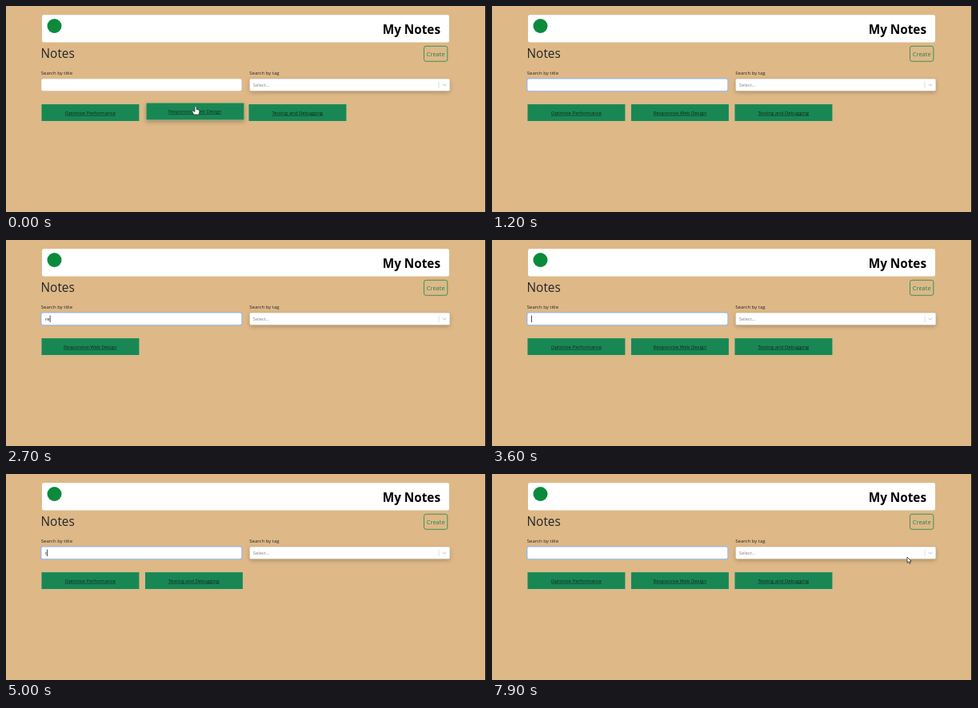
Animation, 600 px wide and 258 px high, one loop 8000 ms. Source, as an HTML page:

```html
<!DOCTYPE html>
<html lang="en">
<head>
<meta charset="utf-8">
<title>My Notes</title>
<style>
  html, body { margin: 0; height: 100%; overflow: hidden; background: #deb887; }
  svg { display: block; width: 100vw; height: 100vh; }
  text { font: 6px "Open Sans", "Noto Sans", sans-serif; fill: #212529; }
  .brand { font-size: 15.3px; font-weight: 700; fill: #000; }
  .heading { font-size: 15.4px; font-weight: 500; }
  .create { font-size: 7.5px; fill: #198754; }
  .hint { font-size: 5.8px; fill: #808080; }
  .card text { text-anchor: middle; text-decoration: underline; fill: #10251b; }
  .field { fill: #fff; stroke: #ced4da; stroke-width: .4; }
  .shade { filter: drop-shadow(0 2.5px 2.5px rgba(0, 0, 0, .22)); }
</style>
</head>
<body>
<svg viewBox="0 0 600 258">
  <rect width="600" height="258" fill="#deb887"/>
  <rect x="599" width="1" height="258" fill="#111"/>

  <rect x="45" y="11" width="509" height="34.5" rx="2.5" fill="#fff"/>
  <circle cx="60.5" cy="25" r="9" fill="#0b8a3c"/>
  <text class="brand" x="543" y="34.6" text-anchor="end">My Notes</text>

  <text class="heading" x="43.5" y="64.5">Notes</text>
  <rect x="522.5" y="50.3" width="29.3" height="19" rx="2.5" fill="none" stroke="#198754" stroke-width=".8"/>
  <text class="create" x="537.2" y="62.6" text-anchor="middle">Create</text>

  <text x="43.8" y="85.6">Search by title</text>
  <text x="304.3" y="85.6">Search by tag</text>

  <rect id="ring" x="43" y="90.2" width="252.6" height="17.2" rx="2.8" fill="#a6b5cf"/>
  <rect id="input" class="field" x="44.2" y="91.3" width="250.3" height="15" rx="2"/>
  <text id="query" x="49" y="101"></text>
  <rect id="caret" y="94.6" width=".8" height="8.4" fill="#222"/>

  <rect class="field shade" x="304.7" y="91.3" width="250" height="15" rx="1.6"/>
  <text class="hint" x="308.8" y="101">Select...</text>
  <path d="M541 94.5v8.6" stroke="#ccc" stroke-width=".6"/>
  <path d="M545.7 97.8l2.3 2.3 2.3-2.3" fill="none" stroke="#bbb" stroke-width=".9"/>

  <g id="cards"></g>

  <g id="hand">
    <path d="M-1 0Q0-1.2 1 0V3.5L4 4.2Q5 4.6 4.8 6L4 10H-2L-4.5 6Q-4 4.7-2.6 5.5L-1 6.6Z" fill="#fff" stroke="#222" stroke-width=".6"/>
  </g>
  <path id="arrow" d="M0 0V7.2L1.7 5.7 2.9 8.2 4.1 7.6 3 5.2H5.2Z" fill="#fff" stroke="#111" stroke-width=".7"/>
  <path id="beam" d="M-1.3-3.5H1.3M0-3.5V3.5M-1.3 3.5H1.3" stroke="#333" stroke-width=".6"/>
</svg>
<script>
const LOOP = 8000, STEP = 100, BLINK = 355;
const FOCUS = 840, REST = 300, HIDE = 1200, RETURN = 7700;
const titles = ['Optimize Performance', 'Responsive Web Design', 'Testing and Debugging'];
const edits = [
  [FOCUS, ''], [1400, 'o'], [1500, 'op'], [2100, 'o'], [2300, ''],
  [2540, 're'], [3200, 'r'], [3600, ''], [4300, 't'], [4500, 'te'],
  [5000, 't'], [5200, '']
];
const $ = id => document.getElementById(id);
const show = (el, on) => el.setAttribute('visibility', on ? 'visible' : 'hidden');
const move = (el, x, y) => el.setAttribute('transform', `translate(${x} ${y})`);
const ease = (t, from, to) => {
  const p = Math.min(1, Math.max(0, (t - from) / (to - from)));
  return p * p * (3 - 2 * p);
};

$('cards').innerHTML = titles.map(title => `<g class="card">
  <rect x="44" y="122.8" width="122.8" height="22" rx=".6" fill="#b5c39a"/>
  <rect x="44.5" y="123.1" width="121.9" height="20.9" fill="#198754"/>
  <text x="105.3" y="135.8">${title}</text></g>`).join('');
const cards = [...$('cards').children];

function drawCards(query, lift) {
  let slot = 0;
  cards.forEach((card, i) => {
    const match = titles[i].toLowerCase().includes(query);
    const up = i === 1 ? lift : 0;
    show(card, match);
    card.style.filter = up ? `drop-shadow(0 ${2 * up}px ${2.5 * up}px rgba(0,0,0,.25))` : '';
    if (match) move(card, 129.5 * slot++ + 1.5 * up, -1.5 * up);
  });
}

function drawPointer(t) {
  const p = ease(t, 0, 600), x = 237 - 42 * p, y = 126 - 27 * p;
  const first = t < HIDE, last = t >= RETURN;
  const back = ease(t, RETURN, LOOP - STEP);
  show($('hand'), t < REST);
  show($('beam'), first && y < 107);
  show($('arrow'), last || first && t >= REST && y >= 107);
  move($('hand'), x, y);
  move($('beam'), x, y);
  move($('arrow'), last ? 526 - 7 * back : x, last ? 112 - 8 * back : y);
}

function draw(time) {
  const t = Math.floor(time % LOOP / STEP) * STEP;
  const [since, query] = edits.filter(e => e[0] <= t).pop() || [0, ''];
  const focused = t >= FOCUS;
  $('query').textContent = query;
  show($('ring'), focused);
  $('input').style.stroke = focused ? '#86b7fe' : '';
  const width = query ? $('query').getComputedTextLength() : 0;
  $('caret').setAttribute('x', 49 + width);
  show($('caret'), focused && Math.floor((t - since) / BLINK) % 2 === 0);
  drawCards(query, 1 - ease(t, REST, REST + 200));
  drawPointer(t);
}

const start = performance.now();
(function tick() {
  draw(performance.now() - start);
  requestAnimationFrame(tick);
})();
</script>
</body>
</html>
```
